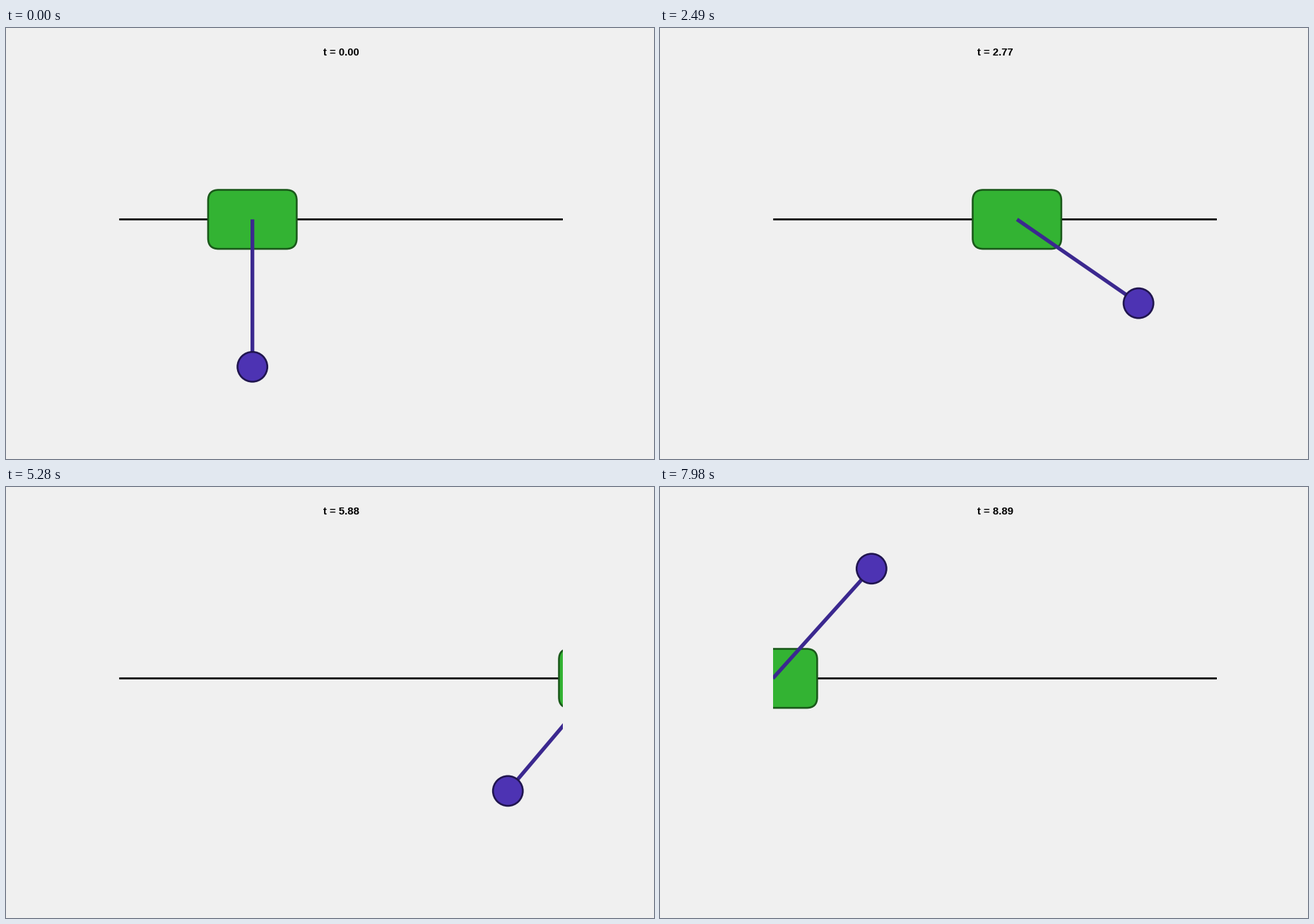
A matplotlib script for the animation above (8000 ms loop, 917 px wide and 611 px high).

```python
import numpy as np
import matplotlib.pyplot as plt
from matplotlib.animation import FuncAnimation
from matplotlib.patches import Circle, FancyBboxPatch, Rectangle

W, H, DPI = 917, 611, 100
FRAMES, LOOP = 267, 8000
DT = 15 / 449                    # simulated seconds per frame
LEFT, RIGHT, RAIL_Y = 160.2, 788, 271.3
ROD = 209                        # rod length in pixels
CART_W, CART_H, CORNER = 0.6 * ROD, 0.4 * ROD, 15
PX = 72 / DPI                    # points per pixel


def spline(t, y, n, v0):
    """Smooth cubic through (t, y): speed v0 at the start, free at the end."""
    t, y = np.array(t, float), np.array(y, float)
    h, d, k = np.diff(t), np.diff(y) / np.diff(t), len(t)
    a, b = np.zeros((k, k)), np.zeros(k)
    a[0, 0], b[0] = 1, v0
    for i in range(1, k - 1):
        a[i, i - 1:i + 2] = h[i], 2 * (h[i - 1] + h[i]), h[i - 1]
        b[i] = 3 * (h[i] * d[i - 1] + h[i - 1] * d[i])
    a[-1, -2:], b[-1] = (1, 2), 3 * d[-1]
    m = np.linalg.solve(a, b)

    i = np.clip(np.searchsorted(t, n, side="right") - 1, 0, k - 2)
    u = (n - t[i]) / h[i]
    return (y[i] * (1 + 2 * u) * (1 - u) ** 2 + h[i] * m[i] * u * (1 - u) ** 2
            + y[i + 1] * u * u * (3 - 2 * u) + h[i] * m[i + 1] * u * u * (u - 1))


steps = np.arange(FRAMES)

# The cart rocks to and fro, then sweeps out to the right and back.
cart_x = spline([0, 32, 46, 66, 83, 119, 176, 224, 243, 266],
                [348.7, 420.9, 452, 418, 505.2, 628.9, 845.2, 627.8, 461, 159.7],
                steps, 0)

# The swing is a sine whose phase, in half turns, slows as it gains height;
# its amplitude is set by the angle (0 = hanging) at a few poses.
phase = np.pi * spline([0, 42, 95, 148, 191, 221, 249.5],
                       [-2, 0, 3, 6, 8, 9, 10], steps, 1 / 20)
pose = np.array([32, 83, 119, 176, 224, 266])
pose_angle = np.array([-0.141, 0.966, 0.817, -0.702, -0.755, 2.41])
amplitude = np.interp(steps, [0, *pose], [0, *pose_angle / np.sin(phase[pose])])
angle = amplitude * np.sin(phase)

fig = plt.figure(figsize=(W / DPI, H / DPI), dpi=DPI, facecolor="#f0f0f0")
ax = fig.add_axes([0, 0, 1, 1])
ax.set_xlim(0, W)
ax.set_ylim(H, 0)
ax.axis("off")

ax.plot([LEFT, RIGHT], [RAIL_Y] * 2, color="black", lw=2.7 * PX,
        solid_capstyle="butt", snap=False, zorder=1)
cart = FancyBboxPatch((0, 0), CART_W, CART_H,
                      boxstyle=f"round,pad=0,rounding_size={CORNER}",
                      fc="#33b333", ec="#1a591a", lw=2.6 * PX, zorder=2)
rod, = ax.plot([], [], color="#3b288f", lw=5.3 * PX,
               solid_capstyle="butt", snap=False, zorder=3)
bob = Circle((0, 0), 0.1 * ROD + 0.2, fc="#4d33b3", ec="#20154f",
             lw=2.6 * PX, zorder=4)
ax.add_patch(cart)
ax.add_patch(bob)
for part in (cart, rod, bob):
    part.set_clip_path(Rectangle((LEFT, 46), RIGHT - LEFT, 498,
                                 transform=ax.transData))
label = ax.text(474.4, 39.3, "", ha="center", va="baseline", color="black",
                family="Liberation Sans", weight="bold", size=14.9 * PX)


def update(n):
    x, q = cart_x[n], angle[n]
    bx, by = x + ROD * np.sin(q), RAIL_Y + ROD * np.cos(q)
    cart.set_bounds(x - CART_W / 2, RAIL_Y - CART_H / 2, CART_W, CART_H)
    rod.set_data([x, bx], [RAIL_Y, by])
    bob.center = bx, by
    label.set_text(f"t = {n * DT:.2f}")
    return cart, rod, bob, label


anim = FuncAnimation(fig, update, frames=FRAMES, interval=LOOP / FRAMES,
                     init_func=lambda: update(0), repeat=True, repeat_delay=0)
plt.show()
```
